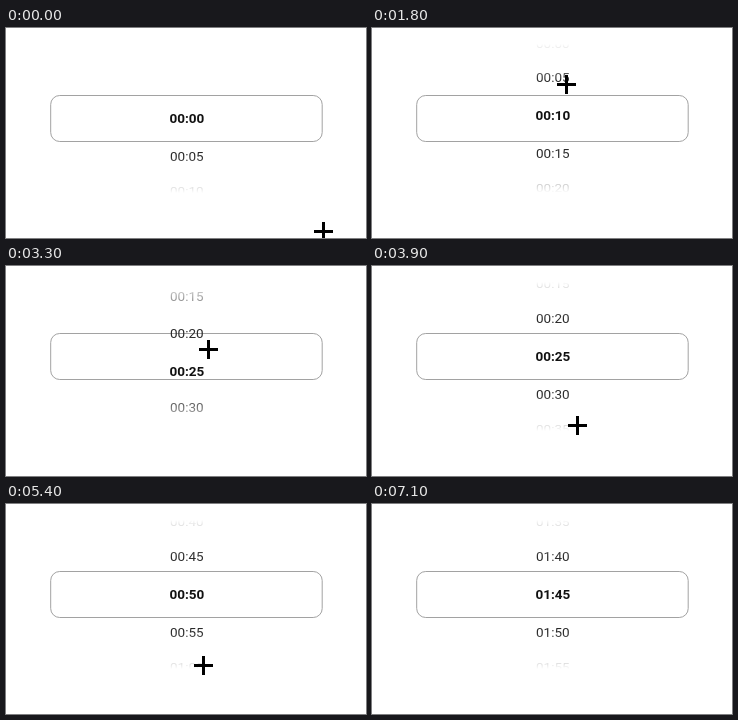
Write an HTML page with a canvas that moves like this. It is 360 by 210 pixels and loops after 7.8 s.

```html
<!DOCTYPE html>
<html lang="en">
<head>
<meta charset="utf-8">
<title>Time wheel</title>
<style>
  html, body { margin: 0; width: 100%; height: 100%; overflow: hidden; background: #fff; }
  canvas { display: block; width: 360px; height: 210px; }
</style>
</head>
<body>
<canvas id="stage"></canvas>
<script>
const LOOP = 7800, STEP = 100;
const ENTER_END = 900, EXIT_END = 7000, SNAP = 200;
const CENTER = { x: 180.8, y: 90.5 };
const RADIUS = 133, ANGLE = 0.287;      // wheel radius and angle between rows
const TOP = 16, BOTTOM = 165;
const ENTRY = [317.5, 203.5], EXIT = [211, 186];

// Each drag moves the cursor and turns the wheel until the given row is centred.
const drags = [
  { start: 1000, end: 1800, row: 2.08, from: [205, 159], to: [194.5, 56.5] },
  { start: 2600, end: 3500, row: 5, from: [198, 154], to: [203, 73] },
  { start: 4000, end: 4600, row: 10, from: [206, 170], to: [201, 42] },
  { start: 5400, end: 6710, row: 21, from: [197.5, 161.5], to: [202, 15.5] }
];

const canvas = document.getElementById("stage");
const ctx = canvas.getContext("2d");
const scale = window.devicePixelRatio || 1;
canvas.width = 360 * scale;
canvas.height = 210 * scale;

const mix = (a, b, u) => a + (b - a) * u;

function ease(time, start, end) {
  const u = Math.min(1, Math.max(0, (time - start) / (end - start)));
  return u * u * (3 - 2 * u);
}

function wheelPosition(time) {
  let position = 0;
  for (const { start, end, row } of drags) {
    position = mix(position, row, ease(time, start, end));
    // After release the wheel snaps to the nearest row.
    if (time > end) position = mix(row, Math.round(row), ease(time, end, end + SNAP));
    if (time < end) break;
  }
  return position;
}

function cursorPosition(time) {
  let point = ENTRY, left = 0;
  const moveTo = (target, start, end) => {
    const u = ease(time, start, end);
    point = point.map((value, i) => mix(value, target[i], u));
    left = end;
  };
  for (const { start, end, from, to } of drags) {
    moveTo(from, left, left ? start : ENTER_END);
    moveTo(to, start, end);
  }
  moveTo(EXIT, left, EXIT_END);
  return point;
}

function label(row) {
  const pad = n => String(n).padStart(2, "0");
  return pad(Math.floor(row / 12)) + ":" + pad(row * 5 % 60);
}

function drawBox() {
  ctx.strokeStyle = "#a2a2a2";
  ctx.lineWidth = 1;
  ctx.beginPath();
  ctx.roundRect(44.7, 67.5, 271.5, 46, 9);
  ctx.stroke();
}

function fade(from, to) {
  const gradient = ctx.createLinearGradient(0, from, 0, to);
  gradient.addColorStop(0, "rgba(255,255,255,0)");
  gradient.addColorStop(1, "#fff");
  ctx.fillStyle = gradient;
  ctx.fillRect(150, Math.min(from, to), 62, Math.abs(to - from));
}

function drawWheel(position) {
  ctx.save();
  ctx.beginPath();
  ctx.rect(150, TOP, 62, BOTTOM - TOP);
  ctx.clip();
  ctx.textAlign = "center";
  const selected = Math.round(position);
  for (let row = Math.max(0, selected - 3); row <= selected + 3; row++) {
    const angle = (row - position) * ANGLE;
    ctx.save();
    ctx.translate(CENTER.x, CENTER.y + RADIUS * Math.sin(angle));
    ctx.scale(1, Math.cos(angle));
    ctx.font = (row === selected ? "bold" : "normal") + " 13.5px Roboto, sans-serif";
    ctx.fillStyle = row === selected ? "#111" : "#2a2a2a";
    ctx.fillText(label(row), 0, 4.7);
    ctx.restore();
  }
  fade(53, TOP);
  fade(128, BOTTOM);
  ctx.restore();
}

function drawCursor([x, y]) {
  const snap = value => Math.floor(value) + 0.5;
  ctx.fillStyle = "#000";
  ctx.fillRect(snap(x) - 9.5, snap(y) - 1.5, 19, 3);
  ctx.fillRect(snap(x) - 1.5, snap(y) - 9.5, 3, 19);
}

function draw() {
  const time = Math.floor(performance.now() % LOOP / STEP) * STEP;
  ctx.setTransform(scale, 0, 0, scale, 0, 0);
  ctx.fillStyle = "#fff";
  ctx.fillRect(0, 0, 360, 210);
  drawBox();
  drawWheel(wheelPosition(time));
  if (time <= EXIT_END) drawCursor(cursorPosition(time));
  requestAnimationFrame(draw);
}
draw();
</script>
</body>
</html>
```
